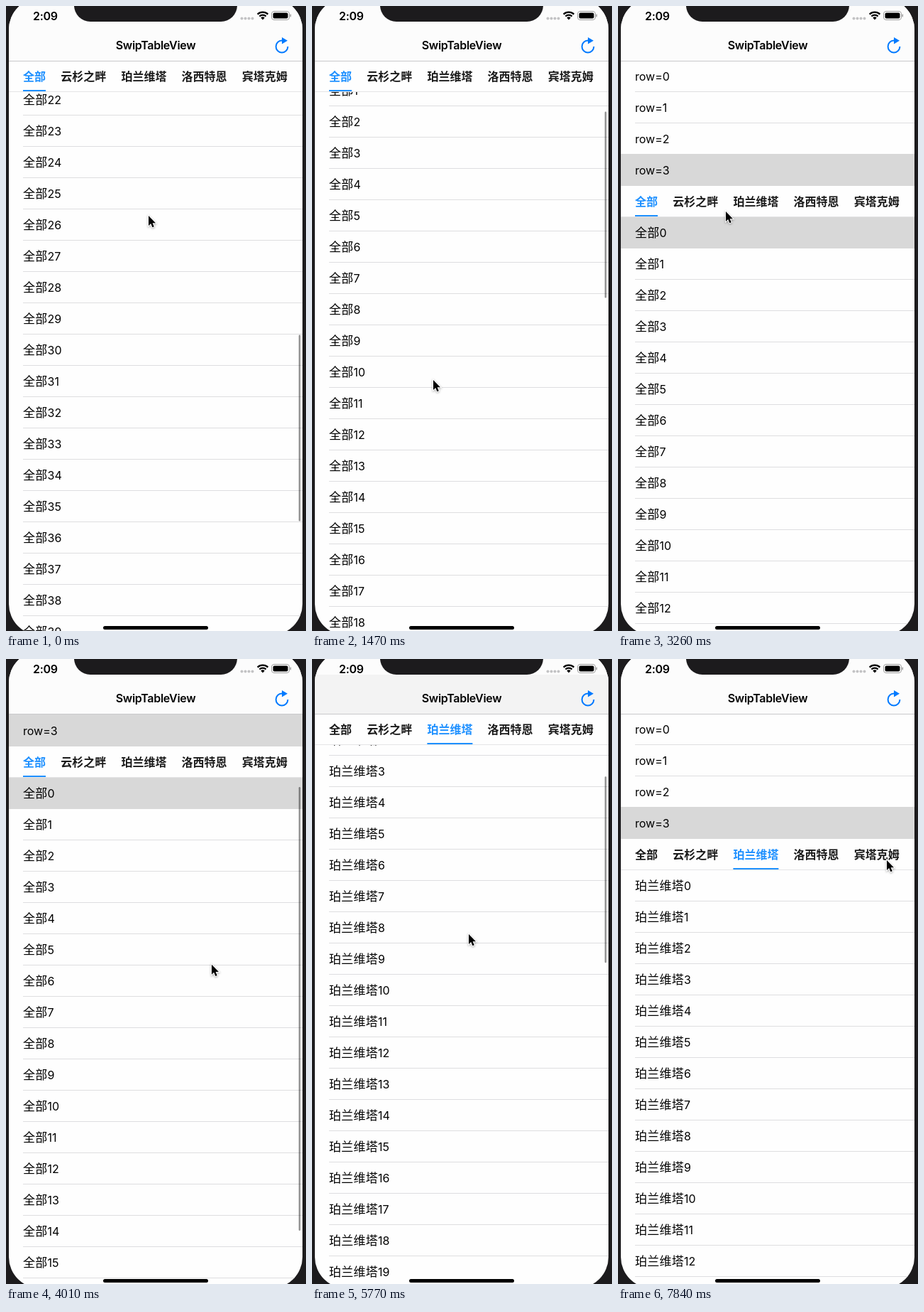
Animation, 423 px wide and 879 px high, one loop 7990 ms. Source, as an HTML page with a canvas:

```html
<!DOCTYPE html>
<html lang="zh-CN">
<head>
<meta charset="utf-8">
<title>SwipTableView</title>
<style>
html, body { margin: 0; width: 100%; height: 100%; overflow: hidden; background: #1c1b1d; }
canvas { display: block; }
</style>
</head>
<body>
<canvas id="stage" width="423" height="879"></canvas>
<script>
const ctx = document.getElementById('stage').getContext('2d');
const LOOP = 7990, TICKS = 54;
const LEFT = 4, WIDTH = 414, TOP = -11, BOTTOM = 885;
const NAV_BOTTOM = 77, ROW = 44, HEADER = 4 * ROW, INSET = 20;
const BLUE = '#1e90ff', PAPER = '#fefefe', BEZEL = '#1c1b1d', SELECTED = '#d8d8d8';
const LATIN = 'Inter, sans-serif';
const CJK = '"Noto Sans CJK SC", "Noto Sans CJK", sans-serif';
const names = ['全部', '云杉之畔', '珀兰维塔', '洛西特恩', '宾塔克姆'];

let nextX = LEFT + INSET;
const tabs = names.map(name => {
  const tab = { name, x: nextX, width: name.length * 16 };
  nextX += tab.width + 21.2;
  return tab;
});

// Where the pointer rests between moves: scrolling, tapping, swiping, pulling down.
const pointerStops = [
  { at: 0, x: 200, y: 294 },
  { at: 10, x: 170, y: 525 },
  { at: 19, x: 150, y: 230 },
  { at: 22, x: 151, y: 288 },
  { at: 28, x: 300, y: 440 },
  { at: 32, x: 165, y: 466 },
  { at: 39, x: 220, y: 386 },
  { at: 47, x: 212, y: 670 },
  { at: 53, x: 378, y: 282 },
];

const ramp = (tick, from, to) => Math.min(1, Math.max(0, (tick - from) / (to - from)));
const ease = (tick, from, to) => {
  const t = ramp(tick, from, to);
  return t * t * (3 - 2 * t);
};
const mix = (a, b, t) => a + (b - a) * t;

function scene(tick) {
  const go = (from, to) => ease(tick, from, to);
  const fling = 1155 * (1 - ramp(tick, 0, 16)) ** 1.585;
  return {
    scroll: Math.round(fling + HEADER * go(25, 28) + 117 * go(36, 39) - 339 * go(40, 47) + 46 * go(48, 52)),
    page: go(29, 32) + go(33, 36),
    underline: go(32, 34) + go(36, 38),
    barAlpha: 1 - go(16, 18) + go(24, 26) - go(28, 30) + go(36, 38) - go(49, 53),
    headerTapped: tick >= 19,
    itemTapped: tick >= 21,
    blurred: tick >= 29,
  };
}

function pointer(tick) {
  const i = Math.max(1, pointerStops.findIndex(stop => stop.at >= tick));
  const a = pointerStops[i - 1], b = pointerStops[i];
  const t = ease(tick, a.at, b.at);
  return [mix(a.x, b.x, t), mix(a.y, b.y, t)];
}

function fill(color, x, y, w, h, radius = 0) {
  ctx.fillStyle = color;
  ctx.beginPath();
  ctx.roundRect(x, y, w, h, radius);
  ctx.fill();
}

function text(str, x, y, font, color = '#000', spacing = 0) {
  ctx.font = font;
  ctx.fillStyle = color;
  ctx.letterSpacing = spacing + 'px';
  ctx.fillText(str, x, y);
  return ctx.measureText(str).width;
}

function arc(x, y, r, from, to, width, color) {
  ctx.strokeStyle = color;
  ctx.lineWidth = width;
  ctx.beginPath();
  ctx.arc(x, y, r, from, to);
  ctx.stroke();
}

function row(name, suffix, x, y, selected) {
  fill('#dedee0', x + INSET, y + ROW - 1, WIDTH - INSET, 1);
  if (selected) fill(SELECTED, x, y - 1, WIDTH, ROW + 1);
  const width = name ? text(name, x + INSET, y + 28, '17px ' + CJK, '#000', .25) : 0;
  text(suffix, x + INSET + width, y + 28, '16px ' + LATIN);
}

function drawLists({ scroll, page, itemTapped }) {
  const top = NAV_BOTTOM + HEADER + ROW - scroll;
  const first = Math.max(0, Math.floor((NAV_BOTTOM - top) / ROW));
  for (let p = Math.floor(page); p <= Math.ceil(page); p++) {
    const x = LEFT + Math.round((p - page) * WIDTH);
    for (let n = first; n < first + 20; n++) {
      row(names[p], String(n), x, top + n * ROW, itemTapped && p + n === 0);
    }
  }
}

function drawHeader({ scroll, headerTapped }) {
  if (scroll >= HEADER) return;
  fill(PAPER, LEFT, NAV_BOTTOM, WIDTH, HEADER - scroll);
  for (let n = 0; n < 4; n++) {
    row('', 'row=' + n, LEFT, NAV_BOTTOM - scroll + n * ROW, headerTapped && n === 3);
  }
}

function drawTabs({ scroll, page, underline }) {
  const y = NAV_BOTTOM + Math.max(0, HEADER - scroll);
  fill(PAPER, LEFT, y, WIDTH, ROW - 1);
  fill('#e4e4e6', LEFT, y + ROW - 1, WIDTH, 1);
  tabs.forEach(({ name, x }, i) =>
    text(name, x, y + 27.5, '600 16px ' + CJK, i === Math.round(page) ? BLUE : '#1a1a1a'));
  const a = tabs[Math.floor(underline)], b = tabs[Math.ceil(underline)], t = underline % 1;
  fill(BLUE, mix(a.x, b.x, t), y + 41, mix(a.width, b.width, t), 2);
}

function drawScrollBar({ scroll, barAlpha }) {
  const inList = scroll >= HEADER;
  const y = inList ? 125 + (scroll - HEADER) * .3447 : 80 + Math.max(0, scroll) * .77;
  const height = inList ? 262 : 624 + Math.min(0, scroll);
  fill(`rgba(0,0,0,${.42 * barAlpha})`, 412.7, y, 2.5, height, 1.25);
}

function drawStatusIcons() {
  for (let i = 0; i < 4; i++) fill('#c3c3c5', 330.5 + i * 5, 15.5, 4, 4, 2);

  const up = -Math.PI / 2, spread = .75;
  for (const r of [10.8, 6.8, 2]) arc(362, 19.5, r, up - spread, up + spread, r > 2 ? 2.3 : 4, '#000');

  ctx.strokeStyle = '#a0a0a0';
  ctx.lineWidth = 1;
  ctx.beginPath();
  ctx.roundRect(374.5, 7.5, 25, 12, 3.5);
  ctx.stroke();
  fill('#000', 376.5, 9.5, 21, 8, 2);
  fill('#a0a0a0', 400.5, 11.5, 1.5, 4, 1);
}

function drawNav({ scroll, blurred }) {
  fill('#fcfcfc', LEFT, TOP, WIDTH, NAV_BOTTOM - TOP);
  if (blurred && scroll >= HEADER) fill('#f3f3f3', LEFT, 22, WIDTH, 55);
  fill('#c9c9cb', LEFT, NAV_BOTTOM, WIDTH, 1);
  ctx.textAlign = 'center';
  text('SwipTableView', 211, 61, '600 16px ' + LATIN, '#000', -.3);
  ctx.textAlign = 'left';
  text('2:09', 38, 19.5, '600 16px ' + LATIN, '#000', -.3);
  drawStatusIcons();

  arc(389, 57, 8.4, 0, Math.PI * 1.5, 2, '#007aff');
  ctx.fillStyle = '#007aff';
  ctx.fill(new Path2D('M389 44v9.5l8-4.8z'));
}

const arrow = new Path2D('M0 0v14l3.2-3 2.2 5.2 2.4-1-2.2-5H10z');

function drawPointer(x, y) {
  ctx.save();
  ctx.translate(x + 1, y + 1);
  ctx.shadowColor = 'rgba(0,0,0,.35)';
  ctx.shadowBlur = 3;
  ctx.shadowOffsetY = 1;
  ctx.strokeStyle = '#fff';
  ctx.lineWidth = 2;
  ctx.stroke(arrow);
  ctx.shadowColor = 'transparent';
  ctx.fillStyle = '#000';
  ctx.fill(arrow);
  ctx.restore();
}

function draw(tick) {
  const state = scene(tick);
  fill(BEZEL, 0, 0, 423, 879);
  ctx.save();
  ctx.beginPath();
  ctx.roundRect(LEFT, TOP, WIDTH, BOTTOM - TOP, 44);
  ctx.clip();
  fill(PAPER, LEFT, TOP, WIDTH, BOTTOM - TOP);
  drawLists(state);
  drawHeader(state);
  drawTabs(state);
  drawScrollBar(state);
  drawNav(state);
  fill('#000', 137, 872, 148, 5, 2.5);
  ctx.restore();
  fill(BEZEL, 96, -40, 230, 62, 23);
  drawPointer(...pointer(tick));
}

// The picture advances in discrete ticks and holds still between them.
function loop() {
  const time = performance.now() % LOOP;
  draw(Math.min(TICKS - 1, Math.floor((time + 10) * TICKS / LOOP)));
  requestAnimationFrame(loop);
}
loop();
</script>
</body>
</html>
```
